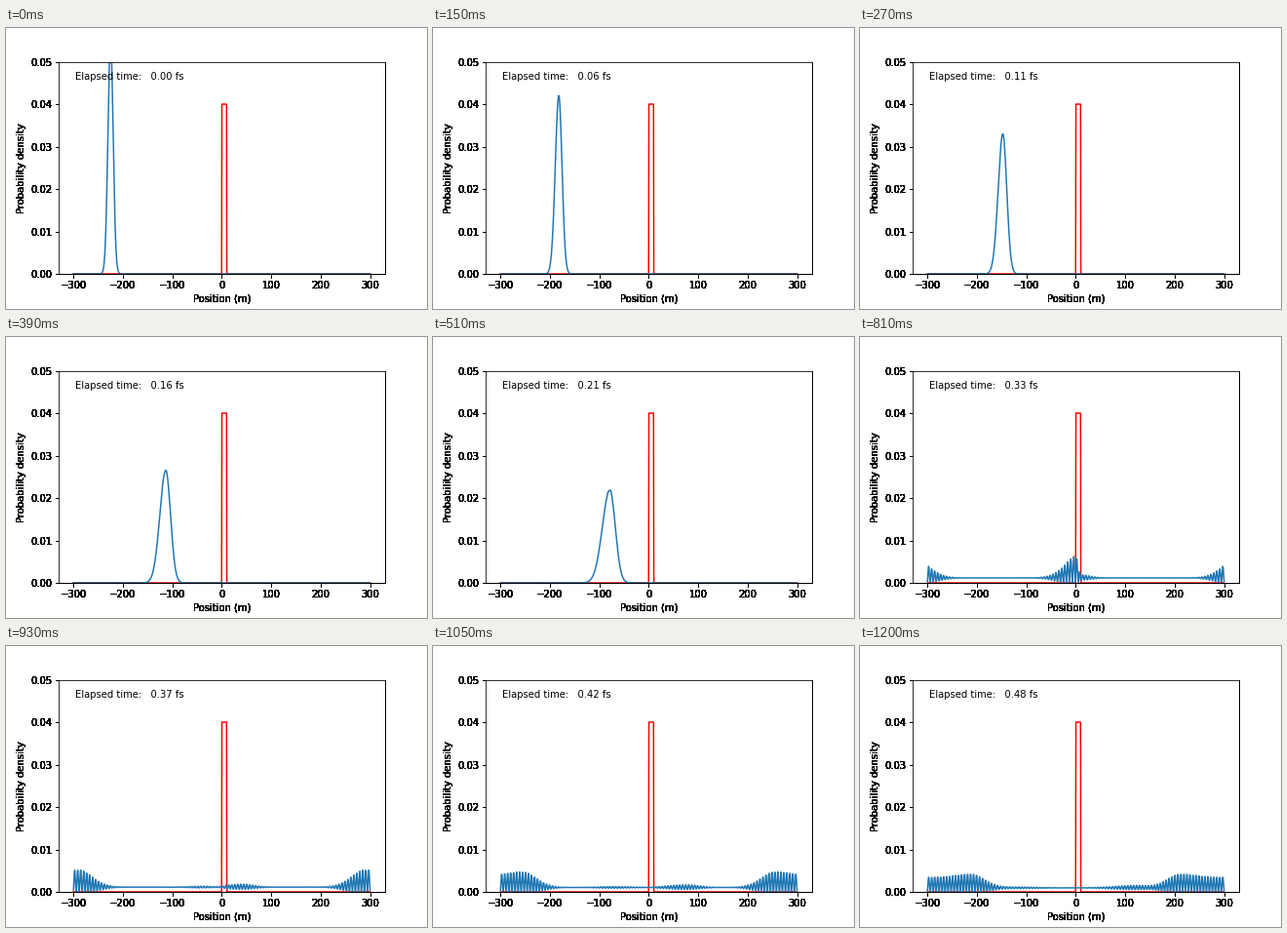
Recreate the animation shown at these times as a matplotlib script. Size 432x288 px, loop 1230 ms.

```python
import numpy as np
import matplotlib.pyplot as plt
from matplotlib.animation import FuncAnimation

FRAMES, STEP_MS = 41, 30
STEP_FS = 0.0120944          # half an atomic unit of time
SPEED = 8.6                  # packet speed per step
K = 2 * np.pi / 6.05         # fringe wave number
EDGE, WALL = 300, 10
BOX = [0.125, 0.125, 0.775, 0.755]

plt.rcParams.update({"font.family": "DejaVu Sans", "font.size": 10})

x = np.linspace(-EDGE, EDGE, 1024)
from_edge = EDGE - np.abs(x)


def packet(pos, n):
    """Amplitude of the free packet, spreading and leaning forward."""
    spread = np.sqrt(52.8 + 3.8 * n + 0.73 * n * n)
    u = pos - (-225 + SPEED * n)
    lean = 0.009 * min(n, 20)
    width = 0.72 * spread * np.where(u < 0, 1 + lean, 1 - lean)
    peak = 1 / np.sqrt(np.sqrt(2 * np.pi) * spread)
    return peak * np.exp(-u**2 / (4 * width**2))


def background(n):
    """Uniform amplitude that fills the box once the packet hits the wall."""
    if n < 27.5:
        return 0.0345 * np.exp(-((n - 27.5) / 4.78) ** 2)
    return 0.0345 - 0.0003 * (n - 27.5)


def edge_wave(n):
    """Amplitude of the wave trains entering from both ends."""
    u = from_edge - (SPEED * (n - 30) + 2)
    bell = np.exp(-u**2 / (4 * 22**2))
    tail = 0.82 + 0.18 * bell
    return (0.0385 - 0.0005 * (n - 31)) * np.where(u < 0, tail, bell)


def density(n):
    left = 1 / (1 + np.exp((n - 26.4) / 1.56))   # share not yet absorbed
    passed = np.interp(x, [0, WALL], [left, 0.08])
    moving = packet(x, n) * passed * np.exp(1j * K * (x + 28))
    bounced = 0.03 * packet(-x, n) * (x < 0) * np.exp(-1j * K * x)
    edges = edge_wave(n) * np.exp(1j * K * (from_edge - 2.5))
    return np.abs(background(n) + moving + bounced + edges) ** 2


def add_axes(name):
    ax = fig.add_axes(BOX, label=name)
    ax.set(xlim=(-330, 330), ylim=(0, 0.05),
           xlabel="Position (m)", ylabel="Probability density")
    ax.set_xticks(range(-300, 301, 100))
    ax.set_yticks(np.arange(6) / 100)
    return ax


fig = plt.figure(figsize=(6, 4), dpi=72, facecolor="white")

# Stacked axes darken the smooth edges of labels, ticks and frame.
for i in range(13):
    add_axes(f"under{i}")
ax = add_axes("main")

ax.plot(x, np.where((x > 0) & (x < WALL), 0.04, 0), "r")
curve, = ax.plot(x, density(0), "C0")
clock = ax.text(0.05, 0.915, "", transform=ax.transAxes)


def update(n):
    curve.set_ydata(density(n))
    clock.set_text(f"Elapsed time: {n * STEP_FS:6.2f} fs")
    return curve, clock


anim = FuncAnimation(fig, update, frames=FRAMES, interval=STEP_MS,
                     repeat=True, repeat_delay=0, blit=False)
plt.show()
```
